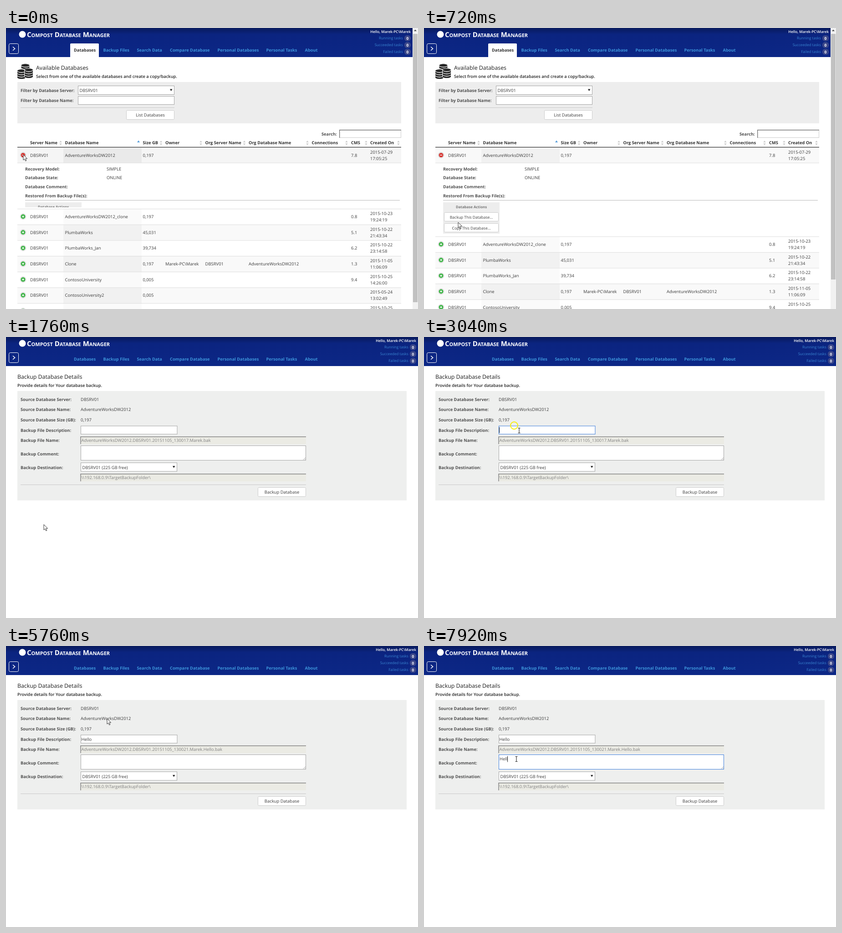
An HTML page that plays this animation: 905 px wide and 619 px high, repeating every 8000 ms.

```html
<!DOCTYPE html>
<html lang="en">
<head>
<meta charset="utf-8">
<title>Database backup walkthrough</title>
<style>
html, body { margin: 0; width: 100%; height: 100%; overflow: hidden; background: #fff; }
svg { display: block; width: 100vw; height: 100vh; }
text { font: 9.45px "Open Sans", "Noto Sans", sans-serif; fill: #3c3c3c; white-space: pre; text-rendering: geometricPrecision; }
.brand { font-size: 15px; font-weight: 700; font-variant: small-caps; fill: #fff; }
.nav { font-size: 9.25px; font-weight: 700; fill: #3d94da; }
.on { fill: #333; }
.h1 { font-size: 12.35px; fill: #1c1c1c; }
.sub { font-size: 9.3px; font-weight: 600; fill: #222; }
.th { font-size: 9.3px; font-weight: 700; fill: #333; }
.label { font-size: 9.25px; font-weight: 700; fill: #505050; }
.grey { fill: #808080; }
.hello { font-size: 8px; font-weight: 600; fill: #fff; }
.task { font-size: 8.15px; fill: #3a86d2; }
.count { font-size: 8.5px; font-weight: 700; fill: #fff; }
.small { font-size: 8.55px; }
.caption { font-size: 7.85px; font-weight: 700; fill: #777; }
.hint { font-size: 8px; }
.mid { text-anchor: middle; }
.end { text-anchor: end; }
</style>
</head>
<body>
<svg id="stage" viewBox="0 0 905 619" preserveAspectRatio="none"></svg>
<script>
const LOOP = 8000, STEP = 80;
const USER = 'Marek', ACCOUNT = `${USER}-PC\\${USER}`;
const DB = 'AdventureWorksDW2012', SERVER = 'DBSRV01';

// Markup helpers
const text = (x, y, s, cls = '', id = '') => `<text x="${x}" y="${y}" class="${cls}" id="${id}">${s}</text>`;
const rect = (x, y, w, h, fill, more = '') => `<rect x="${x}" y="${y}" width="${w}" height="${h}" fill="${fill}" ${more}/>`;
const path = (d, fill, more = '') => `<path d="${d}" fill="${fill}" ${more}/>`;
const line = (x1, x2, y, color) => path(`M${x1} ${y}H${x2}`, 'none', `stroke="${color}"`);
const group = (id, body, more = '') => `<g id="${id}" ${more}>${body}</g>`;
const field = (x, y, w, h, id = '') => rect(x + .5, y + .5, w - 1, h - 1, '#fff', `stroke="#a6a6a6" id="${id}"`);
const button = (x, y, w, h, s, cls = '', id = '') =>
  rect(x + .5, y + .5, w - 1, h - 1, '#fff', `stroke="#ccc" rx="2" id="${id}"`) +
  text(x + w / 2, y + h / 2 + 3.5, s, 'mid ' + cls);
const select = (x, y, w, h, s) => field(x, y, w, h) + text(x + 3.5, y + h / 2 + 4, s) +
  path(`M${x + w - 10} ${y + h / 2 - 2.5}h5.4l-2.7 4.6z`, '#222');
const inset = (x, y, w, h, fill) => rect(x, y, w, h, fill) +
  path(`M${x} ${y + h}V${y + .75}H${x + w}`, 'none', 'stroke="#858585" stroke-width="1.5"');

function barrel(x, y) {
  const band = dy => path(`M${x} ${y + dy}q9.5 5.5 19 0`, 'none', 'stroke="#fff" stroke-width="1.3"');
  return path(`M${x} ${y + 3.5}a9.5 3.8 0 0 1 19 0V${y + 18}a9.5 3.8 0 0 1 -19 0z`, '#262626', 'stroke="#fff"') +
    band(4.5) + band(9.5) + band(14.5);
}

function toggleIcon(x, y, open) {
  return `<circle cx="${x}" cy="${y}" r="6" fill="#fff" stroke="#b5b5b5" stroke-width=".9"/>` +
    `<circle cx="${x}" cy="${y}" r="4.8" fill="${open ? '#d3302b' : '#2fae38'}"/>` +
    path(`M${x - 2.6} ${y}h5.2` + (open ? '' : `M${x} ${y - 2.6}v5.2`), 'none', 'stroke="#fff" stroke-width="1.5"');
}

function header() {
  const tabs = [[149, 'Databases'], [213.5, 'Backup Files'], [287.5, 'Search Data'], [360, 'Compare Database'],
    [464.5, 'Personal Databases'], [571.5, 'Personal Tasks'], [656.5, 'About']];
  const tasks = ['Running', 'Succeeded', 'Failed'].map((s, i) => {
    const y = 22 + i * 15;
    return text(872, y + 3, s + ' tasks', 'task end') +
      rect(875, y - 6, 14, 13, '#3b4789', 'rx="6"') + text(882, y + 3.6, '0', 'count mid');
  }).join('');
  return rect(0, 0, 905, 64, 'url(#navy)') +
    '<circle cx="36" cy="14" r="7.5" fill="#fff"/>' +
    text(46, 20, 'Compost Database Manager', 'brand') +
    rect(6.5, 34.5, 21, 22, 'none', 'stroke="#fff" rx="3"') +
    path('M15 41.5l4.5 4-4.5 4', 'none', 'stroke="#fff" stroke-width="1.6"') +
    path('M141 64V36q0-2 2-2H202q2 0 2 2V64z', '#fff', 'id="activeTab"') +
    tabs.map(([x, s], i) => text(x, 52.3, s, 'nav', i ? '' : 'firstTab')).join('') +
    group('account', text(889, 11, 'Hello, ' + ACCOUNT, 'hello end') + tasks);
}

function row(c, odd, [name, size, cms, day, time, owner, org], id = '') {
  const top = c - 17, b = c + 3.5;
  return rect(25, top, 843, 34.65, odd ? '#f9f9f9' : '#fff', `id="${id}"`) +
    rect(126, top, 172, 34.65, odd ? '#f1f1f1' : '#fafafa', `id="${id && id + 'Sort'}"`) +
    line(25, 868, top + .3, '#ddd') + toggleIcon(37.5, c, !!id) +
    text(53, b, SERVER) + text(129.5, b, name) + text(300.5, b, size) + text(758, b, cms) +
    text(800, b - 7, day) + text(800, b + 7, time) +
    (owner ? text(350, b, owner) + text(437.5, b, SERVER) + text(533, b, org) : '');
}

function listPage() {
  const heads = [[53, 'Server Name', 120], [129.5, 'Database Name', 0], [300.5, 'Size GB', 340.5], [350, 'Owner', 428],
    [437.5, 'Org Server Name', 523.5], [533, 'Org Database Name', 662], [671.5, 'Connections', 748],
    [758, 'CMS', 791], [800, 'Created On', 862]];
  const rows = [
    [DB + '_clone', '0,197', '0.8', '2015-10-23', '19:24:19'],
    ['PlumbaWorks', '45,031', '5.1', '2015-10-22', '21:43:34'],
    ['PlumbaWorks_Jan', '39,734', '6.2', '2015-10-22', '23:14:58'],
    ['Clone', '0,197', '1.3', '2015-11-05', '11:06:09', ACCOUNT, DB],
    ['ContosoUniversity', '0,005', '9.4', '2015-10-25', '14:26:00'],
    ['ContosoUniversity2', '0,005', '', '2015-05-24', '13:02:49'],
    ['', '', '', '2015-10-25', '']];
  const facts = [['Recovery Model:', 'SIMPLE'], ['Database State:', 'ONLINE'],
    ['Database Comment:', ''], ['Restored From Backup File(s):', '']];
  return barrel(33, 79) + barrel(24.5, 91) + barrel(40.5, 89) +
    text(66, 91.7, 'Available Databases', 'h1') +
    text(66, 110, 'Select from one of the available databases and create a copy/backup.', 'sub') +
    rect(25, 119, 843, 91, '#ededed') +
    text(32, 140.5, 'Filter by Database Server:', 'label') + select(158, 127, 212, 20, SERVER) +
    text(32, 163, 'Filter by Database Name:', 'label') + field(158, 150, 212, 19) +
    line(32, 370, 175.5, '#c8c8c8') + button(264, 181, 106, 21, 'List Databases') +
    text(693, 237, 'Search:', 'label') + rect(732.5, 224.5, 135, 17, '#fff', 'stroke="#ccc"') +
    path('M732.7 242V224.7H868', 'none', 'stroke="#777" stroke-width="1.4"') +
    heads.map(([x, s, a]) => text(x, 256, s, 'th') +
      (a ? path(`M${a - 2.8} 252l2.8-4 2.8 4zm0 2.2h5.6l-2.8 4z`, '#cdcdcd') : '')).join('') +
    path('M288 252l3-4.4 3 4.4z', '#5aa0dc') +
    row(280, true, [DB, '0,197', '7.8', '2015-07-29', '17:05:25'], 'top') +
    line(25, 868, 262.5, '#111') + rect(25, 297, 843, 170, '#fff') + line(25, 868, 297.2, '#ddd') +
    group('details', facts.map(([k, v], i) =>
      text(42, 313.6 + i * 19.8, k, 'label') + text(221, 313.6 + i * 19.8, v)).join('') +
      line(42, 865, 379.5, '#b8b8b8') + rect(42, 384, 124, 69, '#ededed') +
      text(104, 397, 'Database Actions', 'caption mid') +
      button(44, 406, 120, 20, 'Backup This Database...', 'small', 'backupBtn') +
      button(44, 430, 120, 20, 'Copy This Database...', 'small'), 'clip-path="url(#fold)"') +
    group('rows', rows.map((r, i) => row(415.4 + i * 34.65, i % 2 === 1, r)).join('')) +
    rect(893, 0, 12, 619, '#f1f1f1') + rect(894, 13, 10, 591, '#c1c1c1', 'id="thumb"') +
    path('M896 7l3-3.5 3 3.5z', '#505050');
}

function formPage() {
  const labels = [[140.5, 'Source Database Server:', SERVER], [163.3, 'Source Database Name:', DB],
    [186, 'Source Database Size (GB):', '0,197'], [208.5, 'Backup File Description:', ''],
    [231, 'Backup File Name:', ''], [261, 'Backup Comment:', ''], [290.5, 'Backup Destination:', '']];
  return text(25, 91.7, 'Backup Database Details', 'h1') +
    text(25, 110, 'Provide details for Your database backup.', 'sub') +
    rect(25, 119, 855, 241, '#eeefee') +
    labels.map(([y, k, v]) => text(32, y, k, 'label') + text(164, y, v)).join('') +
    field(164, 195.5, 212.5, 19, 'descBox') + text(165.5, 208.5, '', '', 'desc') +
    inset(164, 219, 495, 17, '#ebebe4') + text(165.5, 231, '', 'grey', 'fileName') +
    field(164, 239, 495, 33, 'noteBox') + text(166, 252.3, '', '', 'note') +
    path('M653 270.5l5-5M656 270.5l2-2', 'none', 'stroke="#888" stroke-width=".8"') +
    select(164, 276.5, 212, 20, SERVER + ' (225 GB free)') +
    inset(164, 301, 495, 17, '#ebebe4') + text(165.5, 313, '\\\\192.168.0.9\\TargetBackupFolder\\', 'grey') +
    line(32, 659, 325.5, '#c8c8c8') + button(553, 331, 106, 21, 'Backup Database') +
    group('hints', rect(164.5, 215.5, 211, 17, '#fff', 'stroke="#bbb" id="hintBox"') +
      text(167, 226, 'hello', 'hint') + text(167, 243, 'help', 'hint', 'hint2')) +
    rect(0, 0, 1, 13, '#222', 'id="caret"');
}

const stage = document.getElementById('stage');
stage.innerHTML = `<defs>
  <linearGradient id="navy" x2="0" y2="1"><stop stop-color="#081a5c"/><stop offset=".22" stop-color="#0b2480"/><stop offset="1" stop-color="#0c2786"/></linearGradient>
  <clipPath id="fold"><rect id="foldBox" x="25" y="297" width="843" height="98"/></clipPath></defs>` +
  rect(0, 0, 905, 619, '#fff') + header() + group('list', listPage()) + group('form', formPage()) +
  '<circle id="ring" r="8" fill="none" stroke="#f6ee0c" stroke-width="2"/>' +
  group('arrow', path('M0 0V12L2.8 9.5 4.8 14 6.8 13.1 4.8 8.8H8.6Z', '#fff', 'stroke="#222" stroke-width=".9"')) +
  group('beam', path('M-2.5-5.5H-.6L0-5 .6-5.5H2.5M0-5V5M-2.5 5.5H-.6L0 5 .6 5.5H2.5', 'none', 'stroke="#222" stroke-width="1.1"'));

const el = {};
stage.querySelectorAll('[id]').forEach(n => { if (n.id) el[n.id] = n; });
const set = (id, attrs) => { for (const k in attrs) el[id].setAttribute(k, attrs[k]); };
const show = (id, on) => set(id, { display: on ? 'inline' : 'none' });
const within = (t, a, b) => t >= a && t < b;

// Pointer waypoints: time, x, y
const WAY = [[320, 38, 279], [720, 75, 428], [960, 83, 413], [1760, 83, 413], [2560, 210, 209], [2720, 209, 206],
  [5360, 209, 206], [5760, 222, 160], [6160, 239, 258], [6400, 239, 258], [6640, 191, 233], [6800, 191, 233], [6880, 203, 249]];

function pointer(t) {
  const i = WAY.findIndex(w => w[0] > t);
  if (i === 0) return WAY[0].slice(1);
  if (i < 0) return WAY[WAY.length - 1].slice(1);
  const [t0, x0, y0] = WAY[i - 1], [t1, x1, y1] = WAY[i];
  const u = (t - t0) / (t1 - t0), e = u * u * (3 - 2 * u);
  return [x0 + (x1 - x0) * e, y0 + (y1 - y0) * e];
}

const typed = (t, times) => 'Hello'.slice(0, times.filter(k => t >= k).length);

function render(ms) {
  const t = Math.floor(ms / STEP) * STEP;
  const onForm = t >= 1760;
  show('list', !onForm);
  show('form', onForm);
  show('activeTab', !onForm);
  set('firstTab', { class: onForm ? 'nav' : 'nav on' });
  set('account', { transform: `translate(${onForm ? 12 : 0} 0)` });

  const open = t < 80 ? 0 : t < 160 ? .62 : 1;
  set('foldBox', { height: 98 + 61 * open });
  set('rows', { transform: `translate(0 ${61 * open})` });
  set('thumb', { height: 591 - 50 * open });
  const hover = t < 480;
  set('top', { fill: hover ? '#f5f5f5' : '#f9f9f9' });
  set('topSort', { fill: hover ? '#eaeaea' : '#f1f1f1' });
  set('backupBtn', { fill: within(t, 1440, 1600) ? '#f0f0f0' : '#fff' });

  const desc = typed(t, [4240, 4400, 4480, 4640, 4720]);
  const note = typed(t, [7600, 7680, 7840, 7920]);
  el.desc.textContent = desc;
  el.note.textContent = note;
  el.fileName.textContent = `${DB}.${SERVER}.20151105_1300${desc ? 21 : 17}.${USER}.${desc ? desc + '.' : ''}bak`;
  const inDesc = within(t, 3040, 5760), inNote = t >= 6240;
  set('descBox', { stroke: inDesc ? '#3f7fdc' : '#a6a6a6' });
  set('noteBox', { stroke: inNote ? '#3f7fdc' : '#a6a6a6' });
  show('hints', within(t, 4240, 5760));
  show('hint2', t < 4480);
  set('hintBox', { height: t < 4480 ? 34 : 17 });

  const blinkOff = within(t, 3520, 3920) || within(t, 5200, 5680) || within(t, 6720, 7200);
  show('caret', (inDesc || inNote) && !blinkOff);
  if (onForm) {
    const box = inNote ? el.note : el.desc;
    const w = box.textContent ? box.getComputedTextLength() : 0;
    set('caret', inNote ? { x: 166 + w, y: 242.5 } : { x: 165 + w, y: 198.5 });
  }

  const [x, y] = pointer(t);
  const beam = within(t, 2480, 5520) || within(t, 6080, 6560) || t >= 6880;
  show('arrow', !beam);
  show('beam', beam);
  set(beam ? 'beam' : 'arrow', { transform: `translate(${x} ${y})` });
  const off = beam ? 11 : 3;
  show('ring', [1520, 3040, 6240].includes(t));
  set('ring', { cx: x - off, cy: y - off });
}

const start = performance.now();
function tick() {
  render((performance.now() - start) % LOOP);
  requestAnimationFrame(tick);
}
render(0);
requestAnimationFrame(tick);
</script>
</body>
</html>
```
